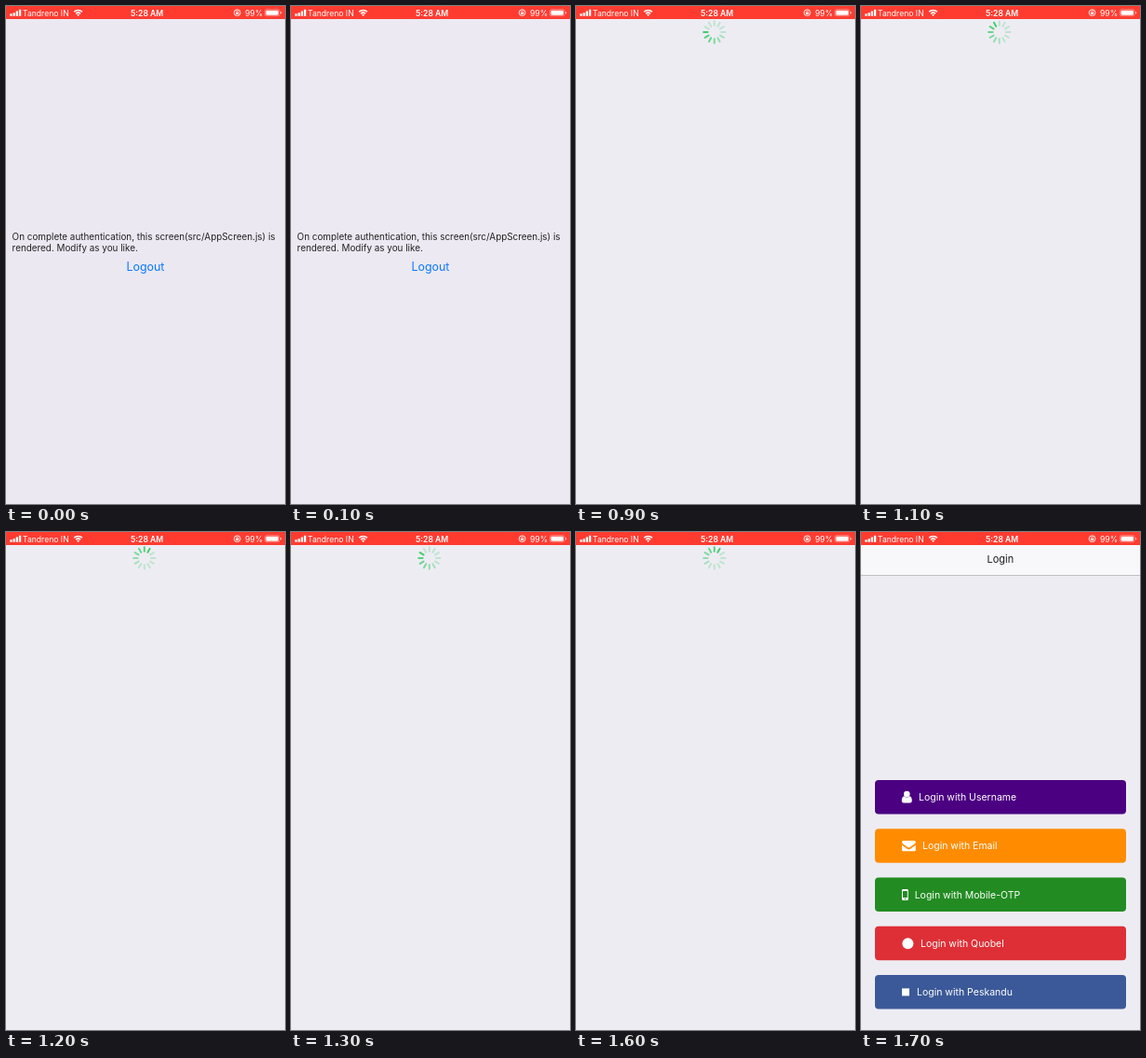
An HTML page for the animation above (3 s loop, 300 by 534 pixels).

```html
<!DOCTYPE html>
<html lang="en">
<head>
<meta charset="utf-8">
<style>
html, body { margin: 0; width: 100%; height: 100%; overflow: hidden; background: #eeecf3; }
svg { display: block; width: 300px; height: 534px; font-family: Inter, Roboto, sans-serif; }
.status { fill: #fff; font-size: 8.6px; }
.line { fill: none; stroke: #fff; }
.mid { text-anchor: middle; }
</style>
</head>
<body>
<svg viewBox="0 0 300 534">
  <rect id="bg" width="300" height="534" fill="#eeecf3"/>

  <g id="home" fill="#222" font-size="9.9">
    <text x="6.6" y="251">On complete authentication, this screen(src/AppScreen.js) is</text>
    <text x="6.6" y="263.4">rendered. Modify as you like.</text>
    <text class="mid" x="150" y="284" font-size="12.4" fill="#0a7aff">Logout</text>
  </g>

  <g id="spinner" transform="translate(148.8 28)" stroke="#3fcf6d" stroke-width="2" stroke-linecap="round"></g>

  <g id="login">
    <rect y="14" width="300" height="32" fill="#f8f7f9"/>
    <rect y="46" width="300" height=".8" fill="#b5b4ba"/>
    <text class="mid" x="149.8" y="33" font-size="11" fill="#1c1c1e">Login</text>
    <g id="buttons" fill="#fff" font-size="10.5"></g>
  </g>

  <g class="status">
    <rect width="300" height="14" fill="#ff3b30"/>
    <path d="M4.3 8.2h2.3v2.6H4.3zM7.5 7.2h2.3v3.6H7.5zM10.7 5.6H13v5.2h-2.3zM13.9 3.8h2.3v7h-2.3z"/>
    <text x="18" y="10.6">Tandreno IN</text>
    <path class="line" stroke-width="1.5" d="M73.2 6.3a6.2 6.2 0 0 1 8.8 0M75.1 8.3a3.6 3.6 0 0 1 5 0"/>
    <path d="M77.6 11l-1.4-1.6a2 2 0 0 1 2.8 0z"/>
    <text class="mid" x="151.7" y="10.7" font-weight="600">5:28 AM</text>
    <circle class="line" cx="248.6" cy="7.2" r="3.4" stroke-width=".9"/>
    <path d="M247 6.8h3.2v2.3H247z"/>
    <path class="line" stroke-width=".6" d="M247.6 7V6a1 1 0 0 1 2 0v1"/>
    <text x="257" y="10.6">99%</text>
    <rect class="line" x="278.4" y="3.7" width="15.6" height="7" rx="1.8" stroke-width=".6" stroke-opacity=".6"/>
    <rect x="279.5" y="4.7" width="13.4" height="5" rx="1"/>
    <path d="M295 5.8q1.2 .3 1.2 1.4t-1.2 1.4z" opacity=".7"/>
  </g>
</svg>
<script>
const LOOP = 3000, STEP = 100;
const $ = id => document.getElementById(id);

const icons = {
  user: '<circle cx="49.3" cy="15" r="3.3"/><path d="M46.4 17.2q2.9 2.6 5.8 0 2.6 .6 2.6 5 0 2.4-2.2 2.4H46q-2.2 0-2.2-2.4 0-4.4 2.6-5z"/>',
  mail: '<path d="M44 14.3q0-1.5 1.5-1.5h11.8q1.5 0 1.5 1.5 0 1-1.2 1.9l-5 3.5q-1.2 .8-2.4 0l-5-3.5q-1.2-.9-1.2-1.9zM44 17.4l5.6 4q1.8 1.2 3.6 0l5.6-4v5.3q0 1.4-1.4 1.4h-12q-1.4 0-1.4-1.4z"/>',
  phone: '<path fill-rule="evenodd" d="M45.3 12.5h4.2q1.3 0 1.3 1.3v9.5q0 1.3-1.3 1.3h-4.2q-1.3 0-1.3-1.3v-9.5q0-1.3 1.3-1.3zM45 14.4v7h4.8v-7zM46.7 23a.7 .7 0 1 0 1.4 0 .7 .7 0 1 0-1.4 0z"/>',
  disc: '<circle cx="50.4" cy="18.4" r="6"/>',
  square: '<rect x="44" y="14.4" width="8" height="8"/>'
};

$('buttons').innerHTML = [
  ['Username', '#4b0082', 62, 'user'],
  ['Email', '#ff8c00', 66, 'mail'],
  ['Mobile-OTP', '#228b22', 57.7, 'phone'],
  ['Quobel', '#de2f36', 64, 'disc'],
  ['Peskandu', '#3b5998', 60, 'square']
].map(([name, color, x, icon], i) => `<g transform="translate(0 ${266 + 52.25 * i})">
  <rect x="15" width="270" height="36.5" rx="4" fill="${color}"/>${icons[icon]}
  <text x="${x}" y="22.2">Login with ${name}</text></g>`).join('');

$('spinner').innerHTML = Array.from({length: 12}, (_, i) =>
  `<path d="M0-7.2V-11.7" transform="rotate(${i * 30})"/>`).join('');
const spokes = [...$('spinner').children];

function show(id, on) {
  $(id).style.display = on ? '' : 'none';
}

function draw(ms) {
  const t = Math.floor(ms % LOOP / STEP) * STEP;
  show('home', t < 900);
  show('spinner', t >= 900 && t < 1700);
  show('login', t >= 1700);

  // The background settles during the first 300 ms.
  const k = Math.min(t / 300, 1);
  $('bg').setAttribute('fill', `rgb(${235 + 3 * k},${232 + 4 * k},${242 + k})`);

  // One turn per second; the spinner restarts at 1300 ms.
  const turn = t < 1300 ? 9.5 + (t - 900) * .012 : 10 + (t - 1300) * .012;
  const head = Math.floor(turn + .001);
  spokes.forEach((s, i) => {
    const age = ((head - i) % 12 + 12) % 12;
    s.setAttribute('opacity', Math.max(.27, 1 - age * .12));
  });
}

const start = performance.now();
function tick() {
  draw(performance.now() - start);
  requestAnimationFrame(tick);
}
tick();
</script>
</body>
</html>
```
